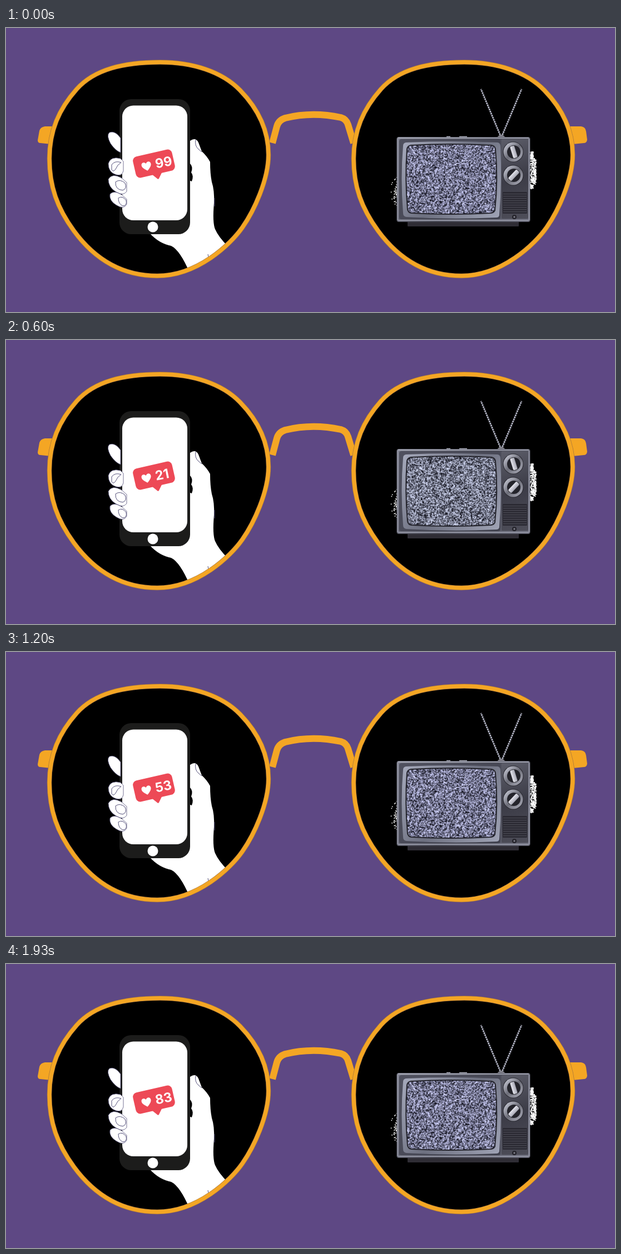
Write an HTML page with a canvas that moves like this. It is 1095 px wide and 511 px high and loops after 1.99 s.

```html
<!DOCTYPE html>
<html lang="en">
<head>
<meta charset="utf-8">
<style>
html, body { margin: 0; width: 100%; height: 100%; overflow: hidden; background: #5e4884; }
canvas { display: block; }
</style>
</head>
<body>
<canvas id="stage" width="1095" height="511"></canvas>
<script>
const stage = document.getElementById('stage');
const LOOP = 1990, LENS_GAP = 547;
const COUNTS = [99, 3, 12, 21, 32, 42, 53, 64, 75, 83];
const ORANGE = '#f4a624', INK = '#54507a';
let ctx = stage.getContext('2d');

function seeded(seed) {
  return () => {
    seed = (seed + 0x6d2b79f5) | 0;
    let t = Math.imul(seed ^ (seed >>> 15), 1 | seed);
    t = (t + Math.imul(t ^ (t >>> 7), 61 | t)) ^ t;
    return ((t ^ (t >>> 14)) >>> 0) / 4294967296;
  };
}

function layer(w, h, draw) {
  const canvas = document.createElement('canvas');
  canvas.width = w;
  canvas.height = h;
  const outer = ctx;
  ctx = canvas.getContext('2d');
  draw();
  ctx = outer;
  return canvas;
}

function fill(path, color) {
  ctx.fillStyle = color;
  ctx.fill(typeof path === 'string' ? new Path2D(path) : path);
}

function stroke(path, color, width) {
  ctx.strokeStyle = color;
  ctx.lineWidth = width;
  ctx.stroke(typeof path === 'string' ? new Path2D(path) : path);
}

function box(x, y, w, h, r, color) {
  const path = new Path2D();
  path.roundRect(x, y, w, h, r);
  fill(path, color);
}

function disc(x, y, r, color) {
  const path = new Path2D();
  path.arc(x, y, r, 0, Math.PI * 2);
  fill(path, color);
}

function gradient(x0, y0, x1, y1, ...colors) {
  const g = ctx.createLinearGradient(x0, y0, x1, y1);
  colors.forEach((c, i) => g.addColorStop(i / (colors.length - 1), c));
  return g;
}

function onEachLens(draw) {
  for (const x of [0, LENS_GAP]) {
    ctx.save();
    ctx.translate(x, 0);
    draw();
    ctx.restore();
  }
}

const lens = new Path2D('M277 61.5C335 61.5 388 78 421 112S472 183 472 228S446 329 425 359' +
  'S345 446 272 446S152 406 122 365S78 285 78 235S95 146 127 110S212 61.5 277 61.5Z');

function drawHand() {
  fill('M331 203Q341 196 346 206L352 222Q361 230 367 241Q367 262 370 277Q375 292 374 315' +
    'Q371 350 376 362Q382 376 400 394L330 440Q313 400 297 392Q276 388 259 370L331 350Z', '#fff');
  stroke('M341 201Q339 212 346 218L352 223M375 306V321M363 407L365 416', INK, 1);
  fill('M331 244Q337 250 333 260Q338 266 334 276L329 274V244Z', '#000');
}

function drawPhone() {
  box(204, 128, 127, 243, 21, '#1c1c1b');
  box(209, 139.5, 117, 206.5, 20, '#fff');
  disc(264, 358, 9.5, '#fff');
}

function drawFingers() {
  const fingers = 'M206 198Q196 184 186 188Q180 193 188 208Q197 221 206 224Z' +
    'M206 235Q188 230 184 244Q184 260 198 264Q209 267 211 257V240Z' +
    'M208 270Q191 260 184 272Q184 287 198 295Q211 303 217 294V278Z' +
    'M208 300Q194 291 187 299Q185 311 199 319Q212 327 217 317V308Z';
  fill(fingers, '#fff');
  stroke(fingers, INK, 0.8);
  stroke('M190 246Q196 238 207 242Q200 246 197 254Q193 260 190 255Z' +
    'M197 277Q205 271 214 279Q218 289 210 292Q196 291 197 277Z' +
    'M202 306Q209 301 216 310Q218 320 210 320Q202 317 202 306Z', INK, 1);
}

function drawBubble() {
  ctx.save();
  ctx.translate(266, 244);
  ctx.rotate(-0.225);
  box(-36, -19.5, 72, 39, 8, '#ed4956');
  fill('M-8 18L0 28Q1 30 3 28L11 18Z', '#ed4956');
  fill('M-14 10C-20 5-23 2-22.5-2C-22-7-16-7-14-3C-12-7-6-7-5.5-2C-5 2-8 5-14 10Z', '#fff');
  ctx.restore();
}

function drawKnob(x, y, angle) {
  disc(x, y, 18.5, '#26262d');
  disc(x, y, 17.5, gradient(x - 14, y - 14, x + 14, y + 14, '#c2c4d0', '#6c6d78', '#a5a6b2'));
  disc(x + 1, y, 12, '#24242b');
  ctx.save();
  ctx.translate(x + 1, y);
  ctx.rotate(angle);
  box(-4, -11, 8, 22, 2, gradient(-4, 0, 4, 0, '#e6e6ee', '#a5a6b2'));
  ctx.restore();
}

function drawTv() {
  const rand = seeded(7);
  // Ragged white cut-out crumbs beside the cabinet.
  ctx.fillStyle = '#fff';
  for (let i = 0; i < 260; i++) {
    const y = 222 + rand() * 66;
    ctx.fillRect(941 + rand() * (y > 234 && y < 280 ? 11 : 6), y, 2, 2);
  }
  for (let i = 0; i < 55; i++) {
    const y = 290 + (rand() + rand() - 1) * 30;
    ctx.fillRect(703 - rand() * rand() * 14, y, 1.6, 1.6);
  }
  ctx.setLineDash([3, 1]);
  stroke('M890 196L854 110M891 196L927 110', '#b4b6c6', 2.8);
  ctx.setLineDash([]);
  fill('M883 197Q890 187 898 197Z', '#85858f');
  box(722, 347, 200, 10, 1, '#2f2d35');

  box(702.5, 196, 240, 153, 4, gradient(703, 196, 942, 349, '#7b7d8b', '#4c4d59', '#666775'));
  box(707, 200, 182, 144, 4, gradient(707, 200, 880, 344, '#50515f', '#41424f'));
  stroke('M705 198H940M792 195.5H799M815 195.5H829', '#b0b2c0', 1.6);
  stroke('M705 346H940M704.5 199V346M940.5 199V346', '#9496a5', 2);
  fill('M719 206Q800 202 884 206Q889 207 889 213Q892 272 887 336Q887 341 881 341' +
    'Q800 345 720 340Q714 339 714 333Q709 270 714 212Q714 207 719 206Z',
    gradient(714, 206, 889, 341, '#a5a9bb', '#6d7080', '#a0a4b6'));

  box(891, 200, 48, 143, 2, gradient(891, 200, 939, 343, '#5c5d69', '#3c3c47', '#4e4e59'));
  drawKnob(912, 223, -0.3);
  drawKnob(912, 265, 0.75);
  box(893, 295, 44, 39, 1, '#2b2a33');
  for (let y = 298; y < 333; y += 4) box(894, y, 42, 1.3, 0, '#4a4953');
  disc(914, 340, 4, '#24232a');
  disc(914, 340, 1.7, '#7d7d88');
}

const background = layer(1095, 511, () => {
  fill('M0 0H1095V511H0Z', '#5e4884');
  onEachLens(() => fill(lens, '#000'));
  ctx.save();
  ctx.clip(lens);
  drawHand();
  drawPhone();
  drawFingers();
  drawBubble();
  ctx.restore();
  drawTv();

  fill('M88 177H70Q62 178 60 185L57 202Q57 207 62 207L81 209Z', ORANGE);
  fill('M1014 177H1034Q1042 178 1043 186L1045 201Q1044 207 1039 207L1019 209Z', ORANGE);
  stroke('M479 207L487 177Q490 166 502 162Q550 150 602 161Q612 164 615 174L625 207', ORANGE, 12);
  onEachLens(() => {
    stroke(lens, '#ab783b', 8.5);
    stroke(lens, ORANGE, 7);
  });
});

function makeStatic(seed, [r, g, b]) {
  const w = 100, h = 78, rand = seeded(seed);
  return layer(w, h, () => {
    const image = ctx.createImageData(w, h);
    for (let i = 0; i < image.data.length; i += 4) {
      const v = 5 + 235 * rand();
      image.data.set([v * r, v * g, v * b + 8, 255], i);
    }
    ctx.putImageData(image, 0, 0);
  });
}

const noise = [makeStatic(11, [0.95, 0.98, 1.07]), makeStatic(29, [0.93, 0.94, 1.1])];
const screen = new Path2D('M728 211Q800 207 873 211Q879 212 880 218Q885 272 879 328' +
  'Q878 332 872 333Q800 337 729 333Q723 332 722 326Q717 270 721 218Q722 212 728 211Z');

function render(now) {
  const t = now % LOOP;
  // The counter steps every 200 ms; the static swaps 130 ms after each step.
  const count = COUNTS[Math.floor(t / 200)];
  const flicker = Math.floor((t + 70) / 200);
  ctx.drawImage(background, 0, 0);

  ctx.save();
  ctx.clip(screen);
  ctx.drawImage(noise[(flicker + 1) % 2], 719, 208, 164, 128);
  ctx.restore();
  stroke(screen, '#24242c', 2);

  ctx.save();
  ctx.translate(271, 253);
  ctx.rotate(-0.2);
  ctx.font = '700 23.5px Inter, sans-serif';
  ctx.fillStyle = '#fff';
  ctx.fillText(count, -1, -0.5);
  ctx.restore();
  requestAnimationFrame(() => render(performance.now() - start));
}

const start = performance.now();
render(0);
</script>
</body>
</html>
```
